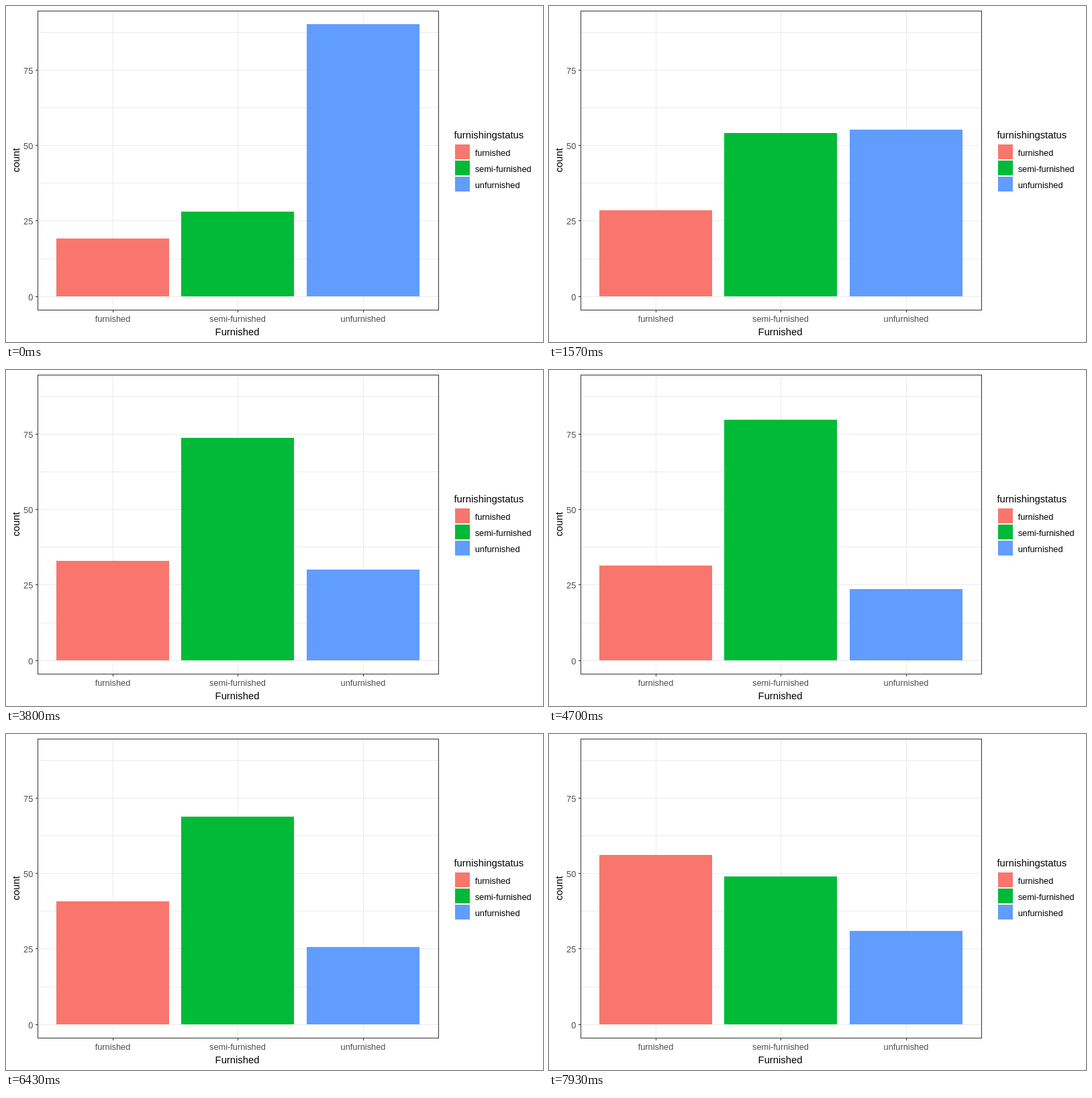
These frames come from a looping animation (800 by 500 pixels, 10000 ms). An HTML page:

```html
<!DOCTYPE html>
<html lang="en">
<head>
<meta charset="utf-8">
<title>Furnishing status</title>
<style>
  html, body { margin: 0; width: 100%; height: 100%; overflow: hidden; background: #fff; }
  svg { display: block; width: 800px; height: 500px; shape-rendering: crispEdges; }
  text { font: 12.8px "Liberation Sans", Arial, sans-serif; }
  .title { font-size: 14.8px; }
  .tick { fill: #4d4d4d; }
  .mid { text-anchor: middle; }
  .end { text-anchor: end; }
  .grid { stroke: #ebebeb; }
  .frame { fill: none; stroke: #333; }
  .furnished { fill: #f8766d; }
  .semi { fill: #00ba38; }
  .unfurnished { fill: #619cff; }
</style>
</head>
<body>
<svg viewBox="0 0 800 500">
  <path class="grid" d="M48 39.5H644M48 95.5H644M48 151.5H644M48 207.5H644M48 263.5H644M48 319.5H644M48 376.5H644M48 432.5H644M159.5 8V452M345.5 8V452M532.5 8V452"/>

  <rect class="bar furnished" x="75" width="168"/>
  <rect class="bar semi" x="261" width="168"/>
  <rect class="bar unfurnished" x="448" width="168"/>

  <path class="frame" d="M47.5 7.5H644.5V452.5H47.5ZM44 95.5H47M44 207.5H47M44 319.5H47M44 432.5H47M159.5 453V456M345.5 453V456M532.5 453V456"/>

  <g class="tick end">
    <text x="40.3" y="101">75</text>
    <text x="40.3" y="213">50</text>
    <text x="40.3" y="325">25</text>
    <text x="40.3" y="438">0</text>
  </g>
  <g class="tick mid">
    <text x="159" y="470">furnished</text>
    <text x="345" y="470">semi-furnished</text>
    <text x="532" y="470">unfurnished</text>
  </g>
  <text class="title mid" x="344.5" y="490">Furnished</text>
  <text class="title mid" transform="translate(20 229.5) rotate(-90)">count</text>

  <text class="title" x="667.5" y="197">furnishingstatus</text>
  <rect class="furnished" x="669" y="206" width="22" height="22"/>
  <rect class="semi" x="669" y="230" width="22" height="22"/>
  <rect class="unfurnished" x="669" y="254" width="22" height="22"/>
  <text x="698.7" y="223">furnished</text>
  <text x="698.7" y="247">semi-furnished</text>
  <text x="698.7" y="271">unfurnished</text>
</svg>
<script>
  const LOOP = 10000, FPS = 30;
  const ZERO = 431.85, UNIT = 4.495, BASE = 432;
  const states = [
    { at: 0, counts: [19, 28, 90] },
    { at: 80, counts: [34, 69, 35] },
    { at: 159, counts: [31, 81, 22] },
    { at: 239, counts: [56, 49, 31] }
  ];
  const bars = document.querySelectorAll('.bar');
  const sineInOut = p => (1 - Math.cos(Math.PI * p)) / 2;

  // Steps of 1/30 s, starting on whole hundredths of a second
  const stepAt = ms => Math.floor((Math.floor(ms / 10) * 10 + 4) * FPS / 1000);

  function countsAt(step) {
    const next = states.findIndex(s => s.at > step);
    if (next < 0) return states[states.length - 1].counts;
    const a = states[next - 1], b = states[next];
    const e = sineInOut((step - a.at) / (b.at - a.at));
    return a.counts.map((c, i) => c + (b.counts[i] - c) * e);
  }

  function draw(now) {
    const counts = countsAt(stepAt(now % LOOP));
    bars.forEach((bar, i) => {
      const top = Math.round(ZERO - counts[i] * UNIT);
      bar.setAttribute('y', top);
      bar.setAttribute('height', BASE - top);
    });
  }

  function tick(now) {
    draw(now);
    requestAnimationFrame(tick);
  }
  draw(0);
  requestAnimationFrame(tick);
</script>
</body>
</html>
```
